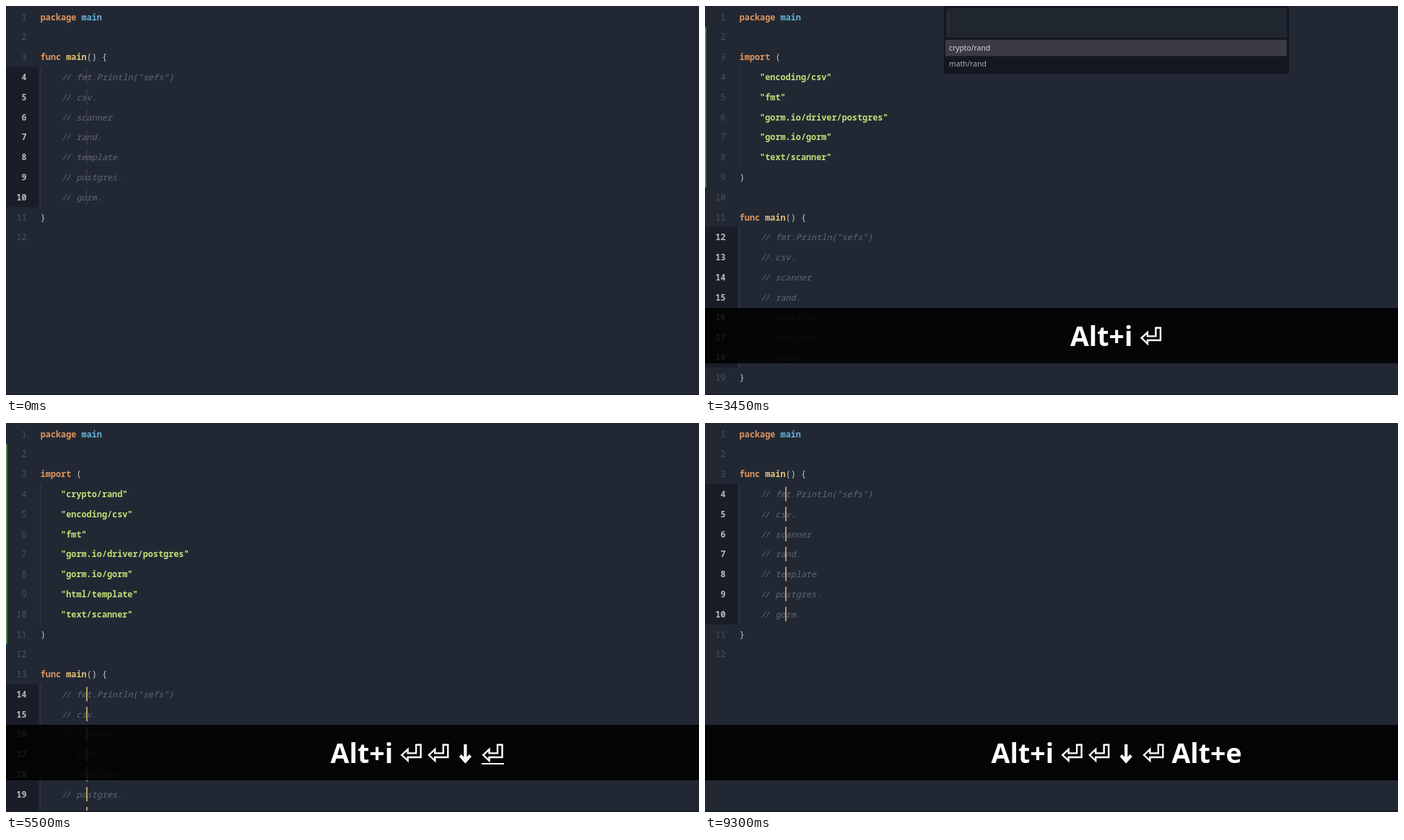
An HTML page that plays this animation: 960 px wide and 540 px high, repeating every 9350 ms.

```html
<!DOCTYPE html>
<html lang="en">
<head>
<meta charset="utf-8">
<title>Import picker</title>
<style>
html, body { margin: 0; width: 100%; height: 100%; overflow: hidden; background: #222833; }
svg { display: block; width: 100vw; height: 100vh; }
.code { font: 500 11.84px "Noto Sans Mono", "DejaVu Sans Mono", monospace; }
.kw { fill: #e0965f; font-weight: 700; }
.pkg { fill: #62b2dc; font-weight: 700; }
.fn { fill: #e3c178; font-weight: 700; }
.op { fill: #c3c7cf; }
.str { fill: #bfe07a; font-weight: 600; }
.com { fill: #606874; font-style: italic; }
.num { fill: #4a515d; text-anchor: end; }
.on { fill: #b4b9c3; font-weight: 600; }
.menu { font: 10.3px "Noto Sans", "Open Sans", sans-serif; fill: #aaaeb6; }
.menu .sel { fill: #d3d6da; }
.keys { font: 700 37.5px "Noto Sans", "Open Sans", sans-serif; fill: #fff; }
</style>
</head>
<body>
<svg id="stage" viewBox="0 0 960 540" xmlns="http://www.w3.org/2000/svg"></svg>
<script>
const LOOP = 9350, LINE = 27.78, TOP = 1.6, COL = 7.105, LEFT = 47.7;
const stage = document.getElementById("stage");
const body = ['fmt.Println("sefs")', "csv.", "scanner", "rand.", "template", "postgres.", "gorm."];

const base = ["encoding/csv", "fmt", "gorm.io/driver/postgres", "gorm.io/gorm"];
const withScanner = [...base, "text/scanner"];
const withRand = ["crypto/rand", ...withScanner];
const all = [...withRand.slice(0, 5), "html/template", "text/scanner"];
const scanners = ["text/scanner", "go/scanner"];
const rands = ["crypto/rand", "math/rand"];
const templates = ["text/template", "html/template"];

// at: start time, blink: when the caret begins to blink, keys: typed keys (I, E = Alt chords; R = return; D = down)
const states = [
  { at: 0, blink: -940, imports: [] },
  { at: 650, blink: -940, imports: [], keys: "I", x: 527 },
  { at: 750, blink: 1150, imports: base, keys: "I", x: 527, menu: scanners },
  { at: 1950, blink: 2510, imports: withScanner, keys: "IR", x: 506, menu: rands, mark: 2500 },
  { at: 3700, blink: 4300, imports: withRand, keys: "IRR", x: 487, menu: templates, mark: 4250 },
  { at: 4700, blink: 4300, imports: withRand, keys: "IRRD", x: 468.3, menu: templates, pick: 1, mark: 5250 },
  { at: 5250, blink: 5800, imports: all, keys: "IRRDR", x: 449.6, mark: 5800 },
  { at: 7500, blink: 8020, imports: [], keys: "IRRDRE", x: 396.6 }
];

const esc = s => s.replace(/&/g, "&amp;").replace(/</g, "&lt;");
const rect = (x, y, w, h, fill, more = "") =>
  `<rect x="${x}" y="${y}" width="${w}" height="${h}" fill="${fill}" ${more}/>`;
const text = (x, y, s, cls = "") => `<text x="${x}" y="${y}" class="${cls}">${esc(s)}</text>`;
const lineTop = i => TOP + i * LINE;

function buildLines(imports) {
  const lines = [[[0, "package", "kw"], [8, "main", "pkg"]], []];
  if (imports.length) {
    lines.push([[0, "import", "kw"], [7, "(", "op"]]);
    imports.forEach(s => lines.push([[4, `"${s}"`, "str"]]));
    lines.push([[0, ")", "op"]], []);
  }
  lines.push([[0, "func", "kw"], [5, "main", "fn"], [9, "()", "op"], [12, "{", "op"]]);
  const first = lines.length;
  body.forEach(s => lines.push([[4.15, "/", "com"], [4.9, "/", "com"], [7, s, "com"]]));
  lines.push([[0, "}", "op"]], []);
  return { lines, first };
}

function drawEditor(s) {
  const { lines, first } = buildLines(s.imports);
  const n = s.imports.length, last = first + body.length;
  const guide = (a, b) => rect(47.5, lineTop(a), 1, (b - a) * LINE, "#323946");
  let out = rect(0, 0, 960, 540, "#222833");
  out += rect(0, lineTop(first), 45, body.length * LINE, "#1a1d28") + guide(first, last);
  if (n) out += guide(3, 3 + n) + rect(0, lineTop(1), 1.6, (n + 3) * LINE, "#5f9c58");
  out += '<g class="code">';
  lines.forEach((tokens, i) => {
    const y = lineTop(i) + 18.1, active = i >= first && i < last;
    out += text(28.7, y, String(i + 1), active ? "num on" : "num");
    for (const [col, str, cls] of tokens) out += text(LEFT + col * COL, y, str, cls);
  });
  out += "</g>";
  if (!s.menu) {
    out += '<g class="caret">';
    body.forEach((_, k) => out += rect(111.2, lineTop(first + k) + 3.6, 1.6, 20, "#e3b970"));
    out += "</g>";
  }
  return out + rect(0, 538, 960, 2, "#1b202a");
}

function drawMenu(s) {
  if (!s.menu) return "";
  const pick = s.pick || 0;
  let out = rect(331, 0, 478, 94, "#151720") + rect(334, 3, 472, 41, "#20262f");
  out += rect(333, 47 + pick * 22, 473, 22.5, "#3b3c43") + '<g class="menu">';
  s.menu.forEach((m, i) => out += text(338, 61.6 + i * 22, m, i === pick ? "sel" : ""));
  return out + "</g>" + rect(336.8, 10, 1.6, 27, "#e0ad5c", 'class="caret"');
}

const returnKey = x => `<path transform="translate(${x} 0)" fill="none" stroke="#fff" stroke-width="2.4"
  d="M1.6 460.8L10 453V458.4H21.5V446.7H28V464H10V468.8Z"/>`;
const downKey = x => `<path transform="translate(${x} 0)" fill="none" stroke="#fff" stroke-width="4.2"
  d="M8.5 446V470M1.5 461.5L8.5 469.5L15.5 461.5"/>`;

function drawKeys(s) {
  if (!s.keys) return "";
  let x = s.x, left = x, out = rect(0, 419, 960, 77, "#000", 'fill-opacity=".87"') + '<g class="keys">';
  for (const k of s.keys) {
    left = x;
    if (k === "I") { out += text(x, 472, "Alt+i"); x += 97; }
    if (k === "E") out += text(x + 2.5, 472, "Alt+e");
    if (k === "R") { out += returnKey(x); x += 37.6; }
    if (k === "D") { out += downKey(x + 6); x += 37.6; }
  }
  out += "</g>";
  return s.mark ? out + rect(left - 0.5, 472, 31, 2, "#fff", 'class="mark"') : out;
}

function caretAlpha(d) {
  if (d < 0) return 1;
  let u = (d % 1500) / 750;
  if (u > 1) u = 2 - u;
  const v = Math.min(1, Math.max(0, (u - 0.2) / 0.7));
  return (1 + Math.cos(Math.PI * v)) / 2;
}

let shown = null;
function render(t) {
  const s = states.filter(v => v.at <= t).pop();
  if (s !== shown) {
    stage.innerHTML = drawEditor(s) + drawMenu(s) + drawKeys(s);
    shown = s;
  }
  stage.querySelector(".caret").setAttribute("opacity", caretAlpha(t - s.blink));
  const mark = stage.querySelector(".mark");
  if (mark) mark.setAttribute("opacity", t < s.mark ? 1 : 0);
}

const start = performance.now();
function tick() {
  render((performance.now() - start) % LOOP);
  requestAnimationFrame(tick);
}
tick();
</script>
</body>
</html>
```
